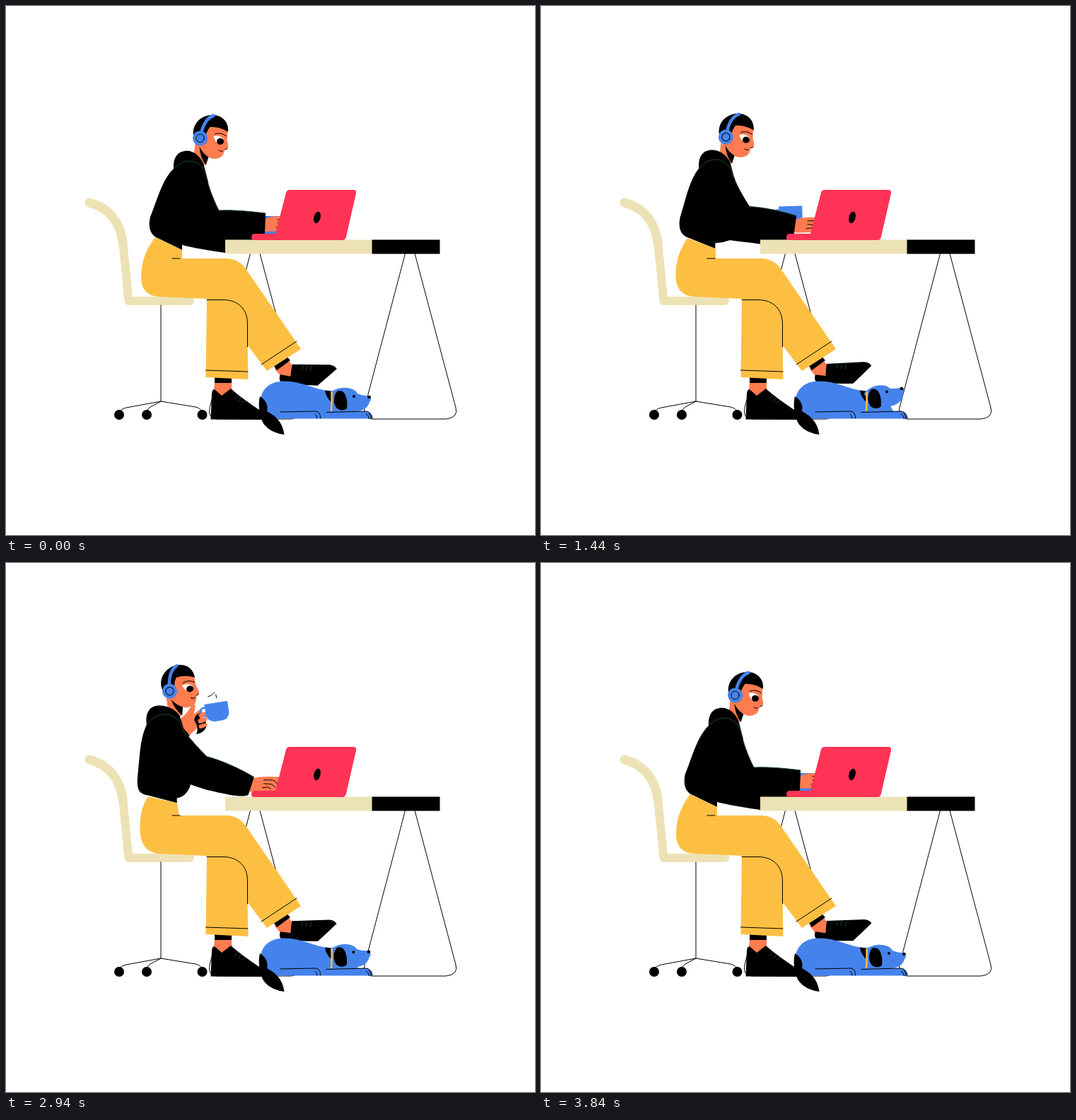
An HTML page for the animation above (3.9 s loop, 748 px wide and 748 px high).

```html
<!DOCTYPE html>
<html lang="en">
<head>
<meta charset="utf-8">
<title>Coffee break at the desk</title>
<style>
html, body { margin: 0; width: 100%; height: 100%; overflow: hidden; background: #fff; }
svg { display: block; width: 100%; height: 100%; }
.line { fill: none; stroke: #000; stroke-width: 1; stroke-linecap: round; stroke-linejoin: round; }
.seam { fill: none; stroke: #1c5138; stroke-width: .9; }
.skin { fill: #ff7b50; }
.blue { fill: #4583ec; }
.gold { fill: #fdbf42; }
.cream { fill: #ede2b5; }
.pink { fill: #ff3356; }
</style>
</head>
<body>
<svg viewBox="0 0 748 748">
  <!-- chair and trestles -->
  <g fill="none" stroke="#ede2b5" stroke-linecap="round" stroke-linejoin="round">
    <path stroke-width="13" d="M118 278C148 286 162 309 165 334"/>
    <path stroke-width="12" d="M165 332L173.500 417H260"/>
  </g>
  <path class="line" d="M219 423V559M160 574Q162 570 170 568L219 559M199.500 574Q200 569 204 567L219 559L268 567Q276 569 277.500 574"/>
  <circle cx="160" cy="578" r="7"/><circle cx="199" cy="578" r="7"/><circle cx="277.500" cy="578" r="7"/>
  <path id="trestle" class="line" d="M564.500 350L507 568Q504 584 518 584H622Q640 582 636 568L578 350"/>
  <use href="#trestle" x="-219"/>

  <g id="head">
    <path class="skin" d="M9 -20L39 -12L38 3Q41 11 39 15L35 16L33 22Q30 29 20 29Q14 29 10.500 25L7 38L-11 38L-7 8Z"/>
    <path d="M-1 12Q4 22 12 26.500L8 38Q0 27 -1 12Z"/>
    <path d="M-9 -2C-13 -19 1 -33 17 -33C31 -33 41 -23 39.500 -9Q27 -17 14 -16Q9 -10 8 -3Z"/>
    <g id="open">
      <path fill="#fff" d="M19 -3Q28 -5 33 1Q34 8 28 9Q21 6 19 -3Z"/>
      <ellipse cx="28.500" cy="4.500" rx="5" ry="4.500"/>
      <path class="line" d="M21 -6Q30 -9 37 -3"/>
    </g>
    <path id="shut" class="line" d="M21.500 -1Q31 -5 33 5"/>
    <path class="line" d="M26.500 17Q30 20 32 18M35 16L38 15"/>
    <path fill="none" stroke="#4583ec" stroke-width="4.500" stroke-linecap="round" d="M2 -9Q7 -28 19 -32"/>
    <circle class="blue" r="10.500"/>
    <circle class="line" r="5.700"/>
  </g>

  <path id="forearm" fill="none" stroke="#000" stroke-width="25"/>
  <path id="steam" class="line" stroke-dasharray="6 16 5 60" d="M-12 -3C-13 -10 -9 -14 -10 -19S-4 -25 -4 -31"/>
  <path id="wisp" class="line" d="M-11 -11Q-4 -13 -2 -17M0 -14L1 -9"/>
  <path id="palm" class="skin" d="M-56 26Q-43 17 -38 7Q-34 0 -31 4Q-30 7 -33 16L-22 8L-19 26L-28 36L-39 46Z"/>
  <g id="cup">
    <path d="M-34 20Q-31 11 -22 11L-26 19L-18 20L-18 31Q-22 40 -34 40Q-28 31 -34 20Z"/>
    <path fill="none" stroke="#4583ec" stroke-width="2.500" d="M-16 5Q-24 4 -23 12Q-22 18 -14 17"/>
    <path class="skin" d="M-27 13Q-17 9 -15 13Q-15 17 -25 19ZM-29 20Q-17 17 -15 20Q-15 25 -28 26ZM-29 28Q-18 25 -16 28Q-18 33 -28 33Z"/>
    <path class="blue" d="M-16.500 0H16.500V16Q15 26 5 26H-5Q-16 25 -16.500 14Z"/>
  </g>

  <path id="torso"/>
  <path id="collar" class="seam"/>

  <!-- legs -->
  <path class="skin" d="M295 532H319V542L305 552L294 543Z"/>
  <path d="M295 525H319V533H295Z"/>
  <path d="M289.500 584.500L291 548Q292 540 296 543L305 551L318 541Q331 553 361 573Q370 578 370 585Z"/>
  <path class="seam" d="M323 556L328 550M328 559L333 554M333 562L338 557"/>
  <path class="gold" d="M284 412H312Q341 420 341 450L342.500 528L282.500 525Z"/>
  <path class="skin" d="M380 513L398 500L405 508L402 524L387 522Z"/>
  <path d="M378 508L396 495L402 501L383 515Z"/>
  <g id="shoe">
    <path d="M405 507L458 509Q465 510 468 515Q455 526 440 538Q405 536 388 531Q385 526 388 521L402 524Z"/>
    <path class="seam" d="M421 509L418 515M427 509L424 516M433 510L430 517"/>
  </g>
  <path id="pants" class="gold"/>
  <path class="line" d="M284 415.500H308C328 416 341.500 428 341.500 450V482M282.500 515L342 517M361 507L411 474M235 357H246"/>

  <g id="hand">
    <path class="skin" d="M2 -11C14 -15 28 -14 42 -13L41 4Q40 6 36 7L-6 8Z"/>
    <path class="line" d="M18 -9L30 -9Q36 -7 37 -3M18 -4L29 -3L34 1M16 2L24 1L28 4"/>
  </g>
  <path id="sleeve"/>
  <path id="seam" class="seam"/>

  <!-- desk and laptop -->
  <path class="cream" d="M310 330.500H518V350.500H310Z"/>
  <path d="M517.500 330.500H613.500V350.500H517.500Z"/>
  <path class="pink" d="M401 260H491Q496 260 495 265L481 326Q480 331 476 331H351Q347 331 347 327Q347 322 352 322H381L396 264Q397 260 401 260Z"/>
  <ellipse rx="4.600" ry="8.500" transform="translate(440 299) rotate(14)"/>

  <!-- dog -->
  <path class="blue" d="M361 574C355 549 367 531 392 530.500C419 530 438 544 460 544L484 546L498 573H508Q518 574 518.500 583.500H380Q365 583 361 574Z"/>
  <path d="M451 543.500L461 545L459.500 560Q452 552 451 543.500Z"/>
  <g id="dogHead">
    <path class="blue" d="M460 546C470 537 492 538 497 548Q506 552 514 551Q518 556 514 560Q511 571 497 573L468 573Z"/>
    <circle cx="492" cy="552" r="2"/>
    <ellipse cx="513.500" cy="553" rx="2.400" ry="2.200"/>
  </g>
  <path id="ear" d="M468 545C478 540 484 554 482 569Q476 574 468 569C462 562 463 551 468 545Z"/>
  <path fill="none" stroke="#fdbf42" stroke-width="2.500" d="M460.500 545Q461 560 460 573"/>
  <path d="M359 552C368 557 371 566 369 573C378 578 391 586 393.500 606C376 604 363 594 361 583C357 573 357 560 359 552Z"/>
  <path class="line" d="M388 574L438 573Q445 574 444.500 583M437 577Q440 579 440 583M453 574.500L509 573Q517 574 518 583M509 577Q513 579 513 583M513 576Q516 579 516 583"/>
</svg>
<script>
const LOOP = 3900, STEP = 60, TAP = 780;
const $ = id => document.getElementById(id);
const lerp = (a, b, k) => a + (b - a) * k;
const set = (id, name, value) => $(id).setAttribute(name, value);
const place = (id, x, y, r = 0) => set(id, "transform", `translate(${x} ${y}) rotate(${r})`);
const show = (id, on) => set(id, "visibility", on ? "visible" : "hidden");

const ramp = (t, from, to) => {
  const u = Math.min(1, Math.max(0, (t - from) / (to - from)));
  return u * u * (3 - 2 * u);
};

// Blend two paths that share the same commands.
const morph = (p, q, k) => {
  const goal = q.match(/[\d.]+/g);
  let i = 0;
  return p.replace(/[\d.]+/g, n => lerp(+n, +goal[i++], k).toFixed(2));
};

// k: 0 bent over the desk, 1 sitting upright; slump rounds the lower back.
function drawBody(k, slump) {
  set("torso", "d", morph(
    "M279 222C270 205 258 204 253 205C243 206 236 214 237 230C220 246 212 280 204 298C201 310 203 322 212 327L249 345L249 337C260 337 290 335 300 320L301 289C297 280 288 262 285 245Z",
    `M238 215C230 203 213 200 205 201C194 202 187 212 190 228C182 250 184 270 ${183 - 4 * slump} 300C${182 - 6 * slump} 320 182 327 198 329L240 338L240 331C250 330 255 318 254 300L280 270C270 262 258 250 245 237Z`, k));
  set("collar", "d", morph("M239 229C250 215 278 212 284 245", "M191 228C205 205 235 207 244 238", k));
  set("pants", "d", morph("M211 327C198 344 191 362 191 384C191 402 202 410 216 411", "M198 331C190 345 189 360 189 375C190 400 200 409 216 411", k)
    + "L284 414L341 479L369 516L417 485L340 373C334 364 326 357 310 357"
    + morph("L249 357L249 345Z", "L244 357L240 338Z", k));
}

function drawArm(k, push) {
  const m = (a, b) => lerp(a, b, k);
  const elbowY = 323 + 26 * (1 - k) ** 2;
  const top = `M${m(285, 245)} ${m(250, 237)}C${m(289, 258)} ${m(262, 250)} ${m(295, 270)} ${m(278, 262)} ${m(301, 280) + push * .75} ${m(289, 270)}`
    + `C${m(325, 300) + push} ${m(288, 277)} ${m(350, 325) + push} ${m(291, 290)} ${m(367, 347) + push} ${m(293, 305)}`;
  set("sleeve", "d", top + `L${m(366, 337) + push} ${m(321, 330)}`
    + `C${m(360, 325)} ${m(335, 331)} ${m(335, 308)} ${elbowY + 3} ${m(310, 295)} ${elbowY}`
    + `C${m(290, 280)} ${elbowY - 3} ${m(265, 262)} ${m(342, 308)} ${m(249, 254)} ${m(338, 303)}Z`);
  set("seam", "d", top);
  place("hand", m(366, 342) + push, m(311, 317));
}

function drawCup(t, k, sip) {
  const lift = t > 2200 ? 1 - (1 - k) ** 2 : k ** 1.6;
  const tip = sip * k ** 4;
  const x = 376 - 102 * k ** 1.2, y = 297 - 100.5 * lift - 7.5 * tip;
  place("cup", x, y, -5 * k - 13 * tip);
  place("palm", x + 5 * tip, y);
  set("forearm", "d", `M${lerp(300, 222, k)} ${lerp(312, 262, k)}L${x - 47} ${y + 36}`);
  place("steam", x, y - (t - 720) * .008);
  show("steam", t >= 420 && t < 1140);
  place("wisp", x, y - (t - 3180) * .01);
  show("wisp", t >= 2940 && t < 3480);
}

function drawHead(t, k, sip) {
  place("head", 274.5 - 45 * k - sip * (26 - 22 * k), 187 - 6 * k - 6 * sip * (1 - k), -3 * k - 16 * sip);
  const shut = t >= 2160 && t < 2760;
  show("open", !shut);
  show("shut", shut);
}

function drawFloor(t) {
  const beat = (t / TAP + .12) % 1;
  const tap = ramp(beat, 0, .3) - ramp(beat, .66, .95);
  set("shoe", "transform", `rotate(${-5 + 10 * tap} 392 520)`);
  const look = ramp(t, 1080, 1380) - ramp(t, 2700, 3060);
  set("dogHead", "transform", `rotate(${-15 * look} 466 560)`);
  place("ear", -1.5 * look, -2.5 * look);
}

function draw(t) {
  const k = ramp(t, 1140, 1980) - ramp(t, 2640, 3720);
  const sip = ramp(t, 1980, 2400) - ramp(t, 2640, 3720);
  drawBody(k, 1 - sip);
  drawArm(k, t < 1440 ? 8 * Math.sin(Math.PI * t / 1440) ** 2 : 0);
  drawCup(t, k, sip);
  drawHead(t, k, sip);
  drawFloor(t);
}

const start = performance.now();
function tick() {
  const t = (performance.now() - start) % LOOP;
  draw(Math.floor(t / STEP) * STEP);
  requestAnimationFrame(tick);
}
tick();
</script>
</body>
</html>
```
